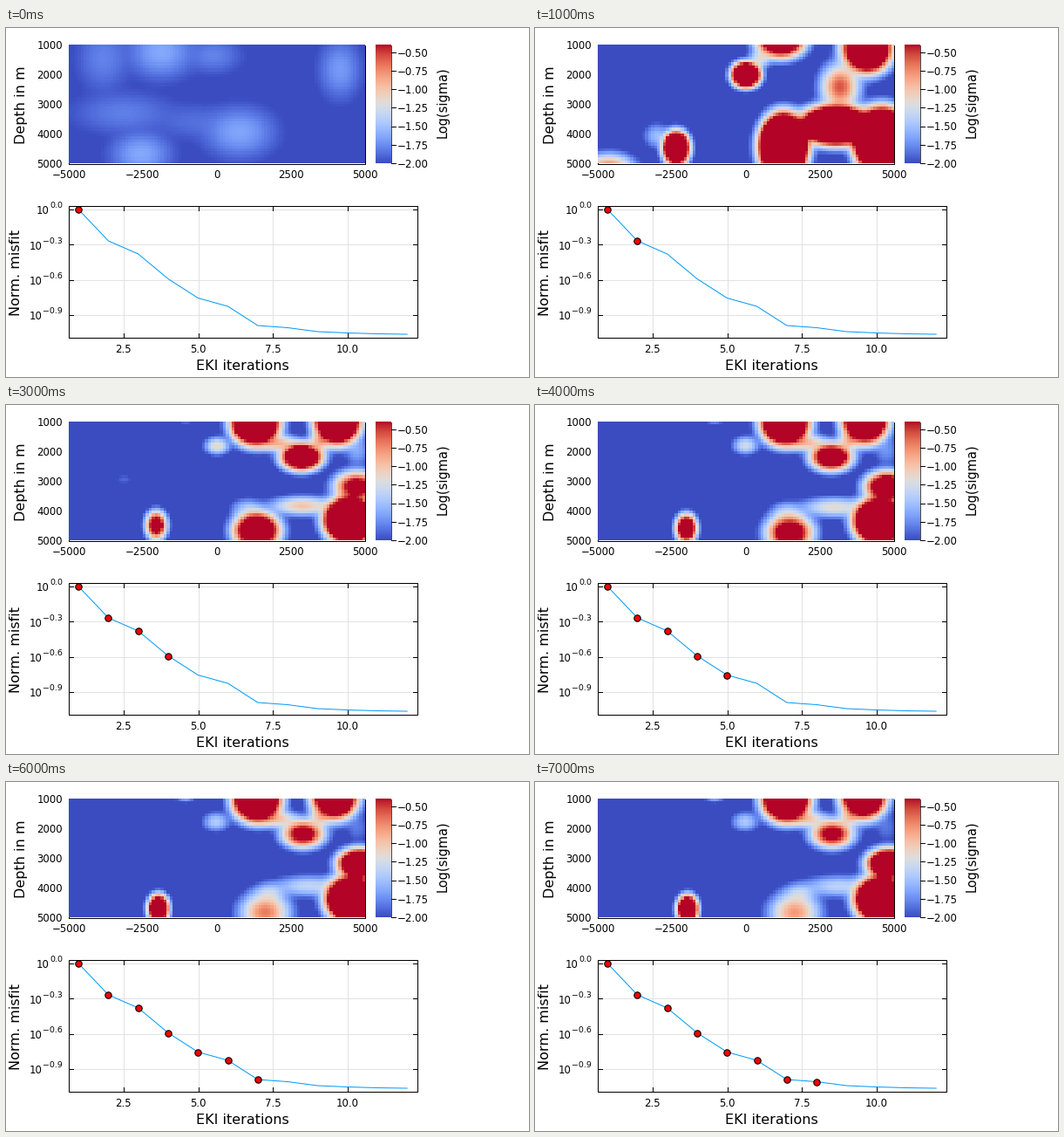
A matplotlib script that plays this animation: 600x400 px, repeating every 8000 ms.

```python
import numpy as np
import matplotlib.pyplot as plt
from matplotlib.animation import FuncAnimation
from matplotlib.patches import Rectangle

W, H, DPI = 600, 400, 100
PT = 72 / DPI
MAP = (72, 412, 155.5, 19.5)
TICK, LABEL = 11.7, 16
STEPS = 8

plt.rcParams["font.family"] = "DejaVu Sans"
fig = plt.figure(figsize=(W / DPI, H / DPI), dpi=DPI, facecolor="white")
ax = fig.add_axes([0, 0, 1, 1])
ax.axis("off")

# Centres of the 100 m cells, in stage pixels
CX, CY = np.meshgrid(MAP[0] + 3.4 * (np.arange(100) + 0.5),
                     MAP[3] + 3.4 * (np.arange(40) + 0.5))


def field(blobs, base=0.25):
    """Soft union of Gaussian blobs (x, y, rx, ry, peak).

    A lone blob fades to zero on its ellipse; the cubic norm keeps
    overlapping blobs from adding up.
    """
    total = 0
    for x, y, rx, ry, peak in blobs:
        amp = max(peak + base, 0)
        fall = max(np.log(amp / base), 0.7) if amp else 1
        q = ((CX - x) / rx) ** 2 + ((CY - y) / ry) ** 2
        total = total + (amp * np.exp(-fall * q)) ** 3
    return np.cbrt(total) - base


def settle(t):
    """Anomalies on their eased way from first to final shape."""
    ease = 1 - (1 - t) ** 2
    return [(x + ease * dx, y + ease * dy, rx, ry, peak + ease * dpeak)
            for x, y, rx, ry, peak, dx, dy, dpeak in anomalies]


prior = [
    (178, 28, 52, 42, .23), (112, 35, 38, 48, .13), (238, 32, 40, 26, .13),
    (135, 98, 72, 30, .12), (155, 145, 48, 35, .23), (268, 120, 56, 40, .22),
    (215, 108, 50, 24, .08), (383, 48, 32, 45, .19),
]

first_guess = [
    (242, 54, 25, 22, 2.5), (282, 13, 42, 32, 2), (258, 36, 16, 14, .5),
    (381, 24, 42, 42, 2.5), (350, 68, 32, 38, .9), (285, 136, 40, 54, 4.5),
    (345, 112, 62, 34, 3), (398, 130, 46, 54, 4.5), (162, 138, 23, 29, 2.6),
    (140, 124, 17, 16, .3), (85, 162, 40, 24, .9),
]

# x, y, rx, ry, peak, then the change of x, y and peak
anomalies = [
    (285, 21, 41, 38, 3, 3, 0, -.4),
    (382, 20, 39, 40, 3, -5, -4, -.6),
    (338, 60, 36, 24, 2.4, 3, 0, -1.2),
    (243, 48, 18, 13, .65, -2, -2, -.3),
    (312, 45, 32, 14, .7, 0, -2, -.1),
    (360, 43, 18, 16, .7, 0, -2, -.15),
    (403, 53, 16, 20, .3, 0, 0, -.2),
    (393, 131, 43, 39, 3.4, 3, 4, -.3),
    (400, 94, 38, 26, .7, 6, 0, 1.5),
    (282, 141, 40, 32, 2.5, 16, 9, -1.75),
    (262, 115, 22, 14, .3, 42, 13, .05),
    (336, 114, 50, 15, .75, 12, 6, -.35),
    (171, 134, 18, 24, .9, 4, 12, 1.3),
    (131, 85, 14, 8, .25, 12, 2, -.5),
    (206, 19, 12, 6, 0, 0, 0, .25),
]

models = [field(prior, base=0.05), field(first_guess)]
models += [field(settle(t)) for t in np.linspace(0, 1, STEPS - 2)]


def text(x, y, s, size=TICK, ha="center"):
    """Horizontal text with its digits centred on y."""
    ax.text(x, y + 0.365 * size, s, size=size * PT, ha=ha, va="baseline")


def side_text(x, y, s, size=LABEL):
    """Upward text with its baseline on x."""
    ax.text(x, y, s, size=size * PT, ha="center", va="baseline",
            rotation=90, rotation_mode="anchor")


def line(xs, ys, color="black", width=1, **kw):
    ax.plot(xs, ys, color=color, lw=width * PT, **kw)


def box(x0, y0, x1, y1, zorder):
    ax.add_patch(Rectangle((x0, y0), x1 - x0, y1 - y0, fill=False,
                           ec="black", lw=PT, zorder=zorder))


def signed(value, digits):
    return f"{value:.{digits}f}".replace("-", "\u2212")


# Conductivity map, laid over its frame
box(72, 20, 412, 156, zorder=-1)
heat = ax.imshow(models[0], cmap="coolwarm", vmin=0, vmax=1, extent=MAP,
                 aspect="auto", interpolation="nearest")
for i in range(5):
    text(72 + 85 * i, 167.5, signed(-5000 + 2500 * i, 0))
    text(65, 20 + 34 * i, str(1000 * (i + 1)), ha="right")
side_text(22, 88, "Depth in m")

# Colour bar
ax.imshow(np.linspace(1, 0, 256)[:, None], cmap="coolwarm",
          extent=(424, 442, 155.5, 19.5), aspect="auto")
line([442, 442], [20, 155], width=0.7)
for i in range(7):
    y = 155 - 21.2 * i
    line([442, 447], [y, y])
    text(449, y + 0.5, signed(-2 + 0.25 * i, 2), ha="left")
side_text(506, 85, "Log(sigma)", 14.6)

# Misfit curve
L, R, T, B = 72, 472, 204, 355
for i in range(4):
    x, y = 134.8 + 85.7 * i, 208 + 40.3 * i
    line([x, x], [T, B], "#e2e2e2", zorder=1)
    line([L, R], [y, y], "#e2e2e2", zorder=1)
    for edge, step in ((T, 5), (B, -5)):
        line([x, x], [edge, edge + step])
    for edge, step in ((L, 5), (R, -5)):
        line([edge, edge + step], [y, y])
    text(x, 367.5, f"{2.5 * (i + 1):.1f}")
    text(65, y - 5, signed(-0.3 * i, 1) if i else "0.0", 9.4, "right")
    text(41.5 if i else 49.3, y + 1.2, "10", ha="right")
box(L, T, R, B, zorder=3)
text(271.5, 386.5, "EKI iterations", LABEL)
side_text(16, 280, "Norm. misfit")

curve_x = 83.2 + 34.27 * np.arange(12)
curve_y = np.array([208, 244, 259, 287.5, 309.5, 319,
                    341, 343.5, 348, 349.5, 350.5, 351])
line(curve_x, curve_y, "#009afa", 1, zorder=4)
dots, = ax.plot([], [], "o", ms=7.4 * PT, mfc="red", mec="black",
                mew=1.1 * PT, zorder=5)

ax.set_xlim(0, W)
ax.set_ylim(H, 0)


def update(i):
    heat.set_data(models[i])
    dots.set_data(curve_x[:i + 1], curve_y[:i + 1])
    return heat, dots


anim = FuncAnimation(fig, update, frames=STEPS, interval=1000,
                     repeat=True, repeat_delay=0)
plt.show()
```
